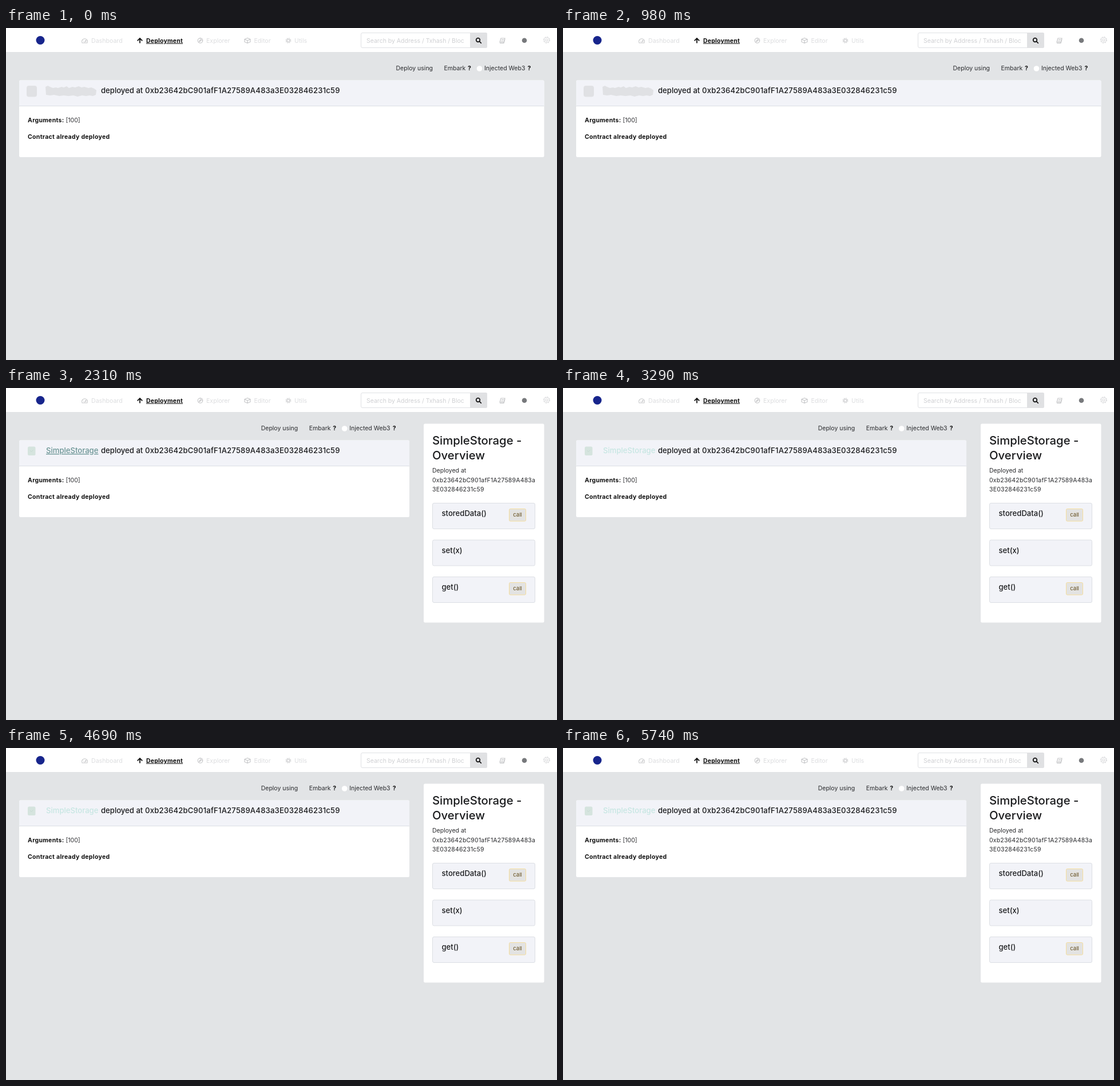
These frames come from a looping animation (963x581 px, 5.81 s). An HTML page:

```html
<!DOCTYPE html>
<html lang="en">
<head>
<meta charset="utf-8">
<title>Contract deployment</title>
<style>
html, body { margin: 0; width: 100%; height: 100%; overflow: hidden; background: #e2e4e6; }
svg { display: block; width: 963px; height: 581px; font: 10.5px Inter, "Noto Sans", sans-serif; fill: #2a2b2e; }
.b { font-weight: 700; letter-spacing: .2px; fill: #111; }
.note { letter-spacing: .3px; }
.m, .h { font-weight: 500; fill: #1a1b1d; }
.m { font-size: 13.1px; }
.h { font-size: 20.3px; }
.addr { letter-spacing: .19px; }
.pale { fill: #dcdddf; }
.icon { fill: none; stroke: #c3c4c6; stroke-width: 1.1; }
.white { fill: #fff; }
.box { fill: #f2f3f8; stroke: #dcdfe4; }
.call rect { fill: #e3e3e2; stroke: #f5dd9c; }
.call text { font-size: 9.6px; fill: #604a1a; text-anchor: middle; }
#name { fill: #c6e6e2; }
#name.hover { fill: #6a9494; text-decoration: underline 1px #9dbcbb; }
</style>
</head>
<body>
<svg viewBox="0 0 963 581">
  <rect width="963" height="42" class="white"/>
  <circle cx="60" cy="21.500" r="7.500" fill="#17258c"/>

  <g class="icon">
    <path d="M133 26a5 5 0 1 1 9 0zM137.500 25l2-4M135 23h1M139 23h2"/>
    <circle cx="339.500" cy="22" r="4.300"/>
    <path d="M337.500 24l1.300-2.700 2.700-1.300-1.300 2.700zM339.500 17v2M344 22h-2"/>
    <path d="M422 17.500l5 2v5l-5 2-5-2v-5zM417.500 20l4.500 2 4.500-2M422 22v4"/>
    <circle cx="493.500" cy="22" r="2.500"/>
    <circle cx="493.500" cy="22" r="4.200" stroke-dasharray="1.700 1.600"/>
    <path d="M865 18h7l-2 7h-7zM866 20.500h4M865 23h4M863 26.500h7l2-7"/>
    <g stroke="#d9dadc">
      <circle cx="945" cy="21" r="2"/>
      <circle cx="945" cy="21" r="4.500"/>
      <circle cx="945" cy="21" r="5.400" stroke-dasharray="2.100 2.140"/>
    </g>
  </g>
  <circle cx="906" cy="21.700" r="4.300" fill="#77797c"/>
  <path d="M234 26.500v-8M229.700 22.300l4.300-4.300 4.300 4.300" fill="none" stroke="#111" stroke-width="1.800"/>

  <g class="pale" font-size="10.6">
    <text x="149" y="25.700">Dashboard</text>
    <text x="350" y="25.700">Explorer</text>
    <text x="433.500" y="25.700">Editor</text>
    <text x="504" y="25.700">Utils</text>
  </g>
  <text x="245" y="25.700" class="b" text-decoration="underline">Deployment</text>

  <rect x="620.500" y="8.500" width="220" height="26" rx="2.500" fill="#fff" stroke="#dfe1e4"/>
  <path d="M811 8h27.500a2.500 2.500 0 0 1 2.500 2.500v22a2.500 2.500 0 0 1-2.500 2.500H811z" fill="#e0e1e3"/>
  <text x="630" y="25.500" fill="#cfd0d3">Search by Address / Txhash / Bloc</text>
  <g fill="none" stroke="#111" stroke-width="1.700">
    <circle cx="825" cy="21" r="3.300"/>
    <path d="M827.500 23.500l3.300 3.300"/>
  </g>

  <g id="options">
    <text x="681.500" y="74">Deploy using</text>
    <text x="765.500" y="74">Embark</text>
    <text x="807" y="74" class="b">?</text>
    <circle cx="827.500" cy="71" r="4.800" class="white"/>
    <text x="836" y="74">Injected Web3</text>
    <text x="911.500" y="74" class="b">?</text>
  </g>

  <rect id="card" x="23" y="91.500" height="134.500" rx="2.500" class="white"/>
  <rect id="head" x="23" y="91.500" height="45" rx="2.500" fill="#f2f3f8"/>
  <rect id="rule" x="23" y="136" height="1" fill="#dcdfe4"/>

  <g id="smudge" fill="#e0e1e4">
    <rect x="36" y="101" width="18" height="19.500" rx="4"/>
    <path d="M69 103l4-2 4 2 5 2 5-1 4 1 6-2 4 1 5-2 4 3 6-2 5 1 6-2 5 2 5-1 7 2 5-1 5 2 4 3-1 8-5 2-6-1-6 1-7-1-8 2-7-2-9 1-8-1-8 1-9-2-7 1-7-1z"/>
  </g>
  <g id="link">
    <rect x="38" y="102.500" width="13.500" height="15.500" rx="2.500" fill="#d5e4de"/>
    <path d="M42 109.500l2.500 2 3-3" fill="none" stroke="#c6d9d1"/>
    <text id="name" x="70" y="114" class="m">SimpleStorage</text>
  </g>
  <text x="166" y="114" class="m">deployed at</text>
  <text x="243" y="114" class="m addr">0xb23642bC901afF1A27589A483a3E032846231c59</text>
  <text x="38" y="165" class="b note">Arguments:</text>
  <text x="104.500" y="165">[100]</text>
  <text x="38" y="194" class="b note">Contract already deployed</text>

  <g id="panel">
    <rect x="730" y="62.500" width="210.500" height="348" rx="2.500" class="white"/>
    <text x="745" y="98.500" class="h">SimpleStorage -</text>
    <text x="745" y="124.500" class="h">Overview</text>
    <text x="745" y="148">Deployed at</text>
    <text x="745" y="164.500" class="addr">0xb23642bC901afF1A27589A483a</text>
    <text x="745" y="181" class="addr">3E032846231c59</text>
    <g id="methods"></g>
  </g>
</svg>
<script>
const LOOP = 5810, REVEAL = 1400, OPEN = 2310, LEAVE = 2800;
const $ = id => document.getElementById(id);
const show = (id, on) => $(id).setAttribute('visibility', on ? 'visible' : 'hidden');

const callButton = `<g class="call">
  <rect x="879.500" y="211.500" width="29" height="21.500" rx="2"/>
  <text x="894" y="225.300">call</text></g>`;

$('methods').innerHTML = ['storedData()', 'set(x)', 'get()'].map((label, i) =>
  `<g transform="translate(0 ${i * 64.5})">
    <rect class="box" x="745.500" y="201.500" width="179" height="45" rx="2.500"/>
    <text class="m" x="761.500" y="224.300">${label}</text>
    ${label === 'set(x)' ? '' : callButton}</g>`).join('');

function draw(t) {
  const open = t >= OPEN;
  show('smudge', t < REVEAL);
  show('link', t >= REVEAL);
  show('panel', open);
  $('name').classList.toggle('hover', t < LEAVE);
  $('options').setAttribute('transform', `translate(${open ? -235.8 : 0} 0)`);
  for (const id of ['card', 'head', 'rule']) $(id).setAttribute('width', open ? 682 : 917.5);
}

function frame() {
  draw(performance.now() % LOOP);
  requestAnimationFrame(frame);
}
frame();
</script>
</body>
</html>
```
